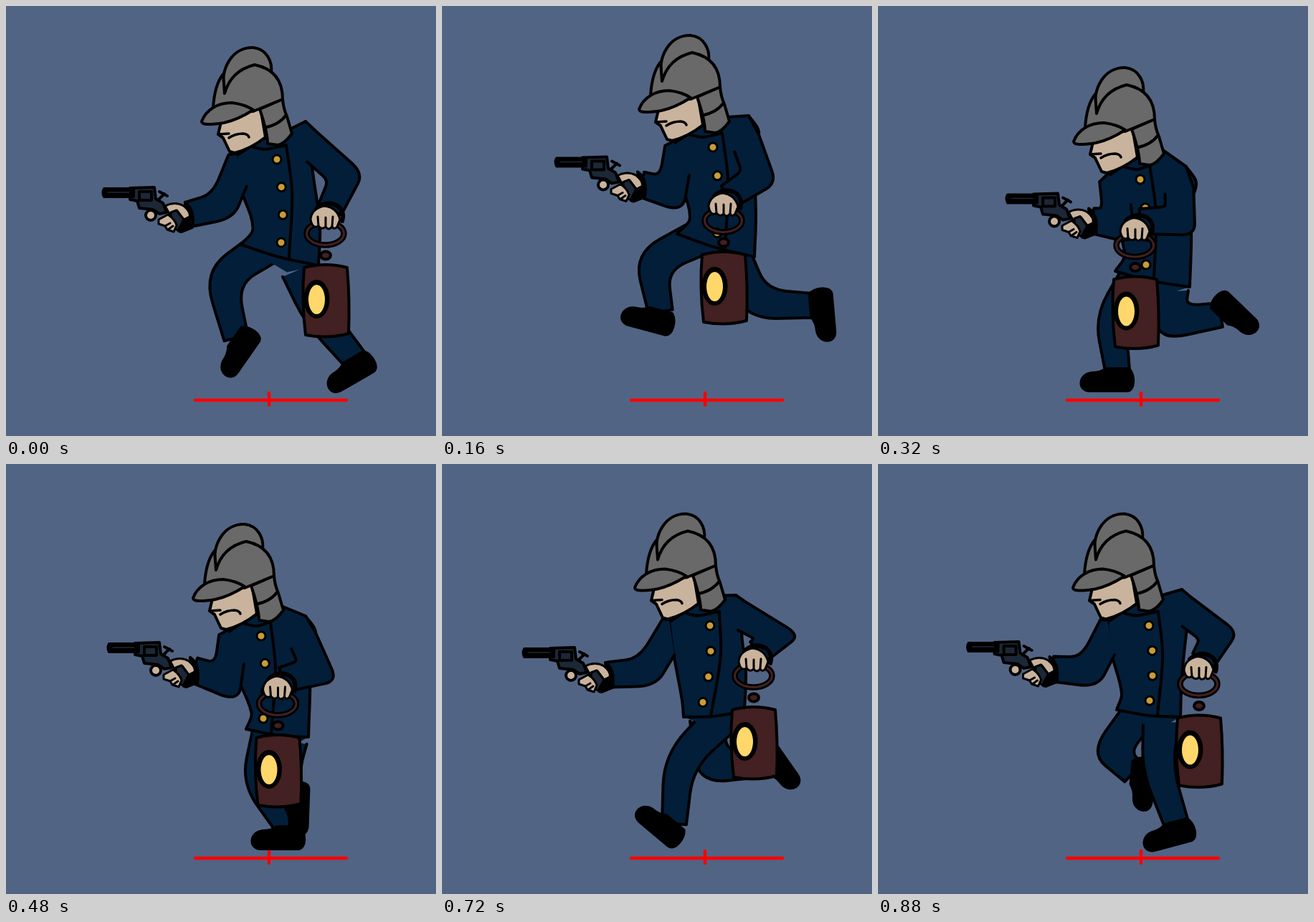
These frames come from a looping animation (600 px wide and 600 px high, 960 ms). An HTML page:

```html
<!DOCTYPE html>
<html lang="en">
<head>
<meta charset="utf-8">
<title>Running fireman</title>
<style>
html, body { margin: 0; width: 100%; height: 100%; overflow: hidden; background: #526484; }
svg { display: block; width: 100vw; height: 100vh; }
.ink { stroke: #000; stroke-width: 4; stroke-linejoin: round; stroke-linecap: round; }
.line { fill: none; }
.navy { fill: #031e39; }
.steel { fill: #696969; }
.skin { fill: #cab39c; }
.bag { fill: #432021; }
.iron { fill: #1c2737; }
.gold { fill: #c99c36; stroke-width: 3; }
.thin { stroke-width: 3; }
</style>
</head>
<body>
<svg viewBox="0 0 600 600">
  <defs>
    <path id="shoe" d="M-16 -2H16C24 6 25 28 14 29H-38C-56 29 -54 6 -36 4Q-24 4 -16 -2Z"/>
  </defs>
  <rect width="600" height="600" fill="#526484"/>
  <path d="M264 550H475M367 540V557" stroke="#f00" stroke-width="4.5" stroke-linecap="round"/>
  <g class="ink">
    <path id="legA" class="navy"/>
    <use id="shoeA" href="#shoe"/>
    <path id="legB" class="navy"/>
    <use id="shoeB" href="#shoe"/>
    <path id="seat" class="navy" stroke="none"/>
    <path id="coat" class="navy"/>
    <path id="gunArm" class="navy"/>
    <path id="placket" class="line"/>
    <g id="buttons"></g>
    <path id="bagArm" class="navy"/>

    <g id="head">
      <path class="skin" d="M300 162L296 179L303 184L312 203L319 205Q342 199 362 183L355 142Z"/>
      <path class="line" d="M296 179L311 178M311 184Q320 178 331 178Q338 179 339 183" stroke-width="3.5"/>
      <path class="steel" d="M305 122C297 86 317 57 345 58C364 60 372 78 370 93L347 84Z"/>
      <path class="steel" d="M354 144L386 130Q387 143 392 154L399 178Q388 193 379 194L365 192Q365 176 354 144Z"/>
      <path class="line" d="M360 170Q381 166 391 152"/>
      <path class="steel" d="M289 142Q291 110 303 95L305 122Q314 90 347 82Q386 90 386 130L345 147Z"/>
      <path class="steel" d="M273 161C279 145 295 135 315 135Q333 137 345 145Q323 159 304 163Q273 168 273 161Z"/>
    </g>

    <g id="gun">
      <path d="M250 274Q264 284 260 309L245 315Q235 314 244 303Q253 292 250 274Z"/>
      <path class="iron" d="M173 254L207 253L209 269L219 275L224 288L214 290L205 284L186 282L183 272L173 270Z"/>
      <path d="M137 255H178V266H137Q134 260 137 255Z"/>
      <path class="line" d="M142 260H172" style="stroke:#1c2737;stroke-width:1.5"/>
      <path class="iron" d="M186 259H203V271H186Z"/>
      <path class="line" d="M213 270L221 262M214 259L225 265"/>
      <path class="skin thin" d="M222 279Q236 272 248 279Q258 287 256 294L248 298L239 286L228 290Z"/>
      <path class="iron thin" d="M230 288L238 285L248 298L240 313L231 309Z"/>
      <circle class="skin" cx="202" cy="292" r="7"/>
      <path class="skin thin" d="M213 298L226 291Q236 298 238 306L234 315L225 312L222 307L213 304Z"/>
      <path class="line thin" d="M222 307L229 303M226 312L233 307"/>
    </g>

    <g id="bag">
      <path class="line" d="M433 283Q447 270 463 279Q473 287 469 300" stroke-width="6"/>
      <ellipse class="line" cx="445.500" cy="317.500" rx="26" ry="16" stroke-width="8.5"/>
      <ellipse class="line" cx="445.500" cy="317.500" rx="26" ry="16" style="stroke:#432021;stroke-width:3"/>
      <path class="skin thin" d="M425 298Q426 283 444 279Q462 281 466 298L462 308Q458 313 455 308Q450 314 446 308Q441 313 436 307Q428 312 425 298Z"/>
      <path class="line thin" d="M435 294L436 307M446 295V308M456 294L455 308"/>
      <ellipse class="bag" cx="446" cy="348" rx="7" ry="5.500"/>
      <path class="bag" d="M416 365Q446 357 476 365Q480 410 478 457Q450 465 418 459Q412 410 416 365Z"/>
      <ellipse cx="433.500" cy="409" rx="16" ry="25"/>
      <ellipse cx="433.500" cy="409.500" rx="11.500" ry="20.500" fill="#ffd76b" stroke="none"/>
    </g>
  </g>
</svg>
<script>
const STEP = 80, COUNT = 12;

// Steps of the run cycle at which the joints below are set.
const beats = [0, 2, 4, 6, 8, 9, 11];
const joints = {
  head: [[0, 0], [2, -17], [0, 28], [-12, 26], [0, 3.5], [-4, 11.5], [-1, 11.5]],
  gun: [[0, 0], [23, -42.5], [44, 8.5], [7, -4], [-8, -20], [-22, 3], [-10.5, -5]],
  bag: [[0, 0], [-53, -18], [-87, 16.5], [-66.5, 17], [-29, -18], [-11, -22], [2, -10.5]],
  back: [[418, 161], [428, 153], [430, 224], [418, 212], [415, 185], [410, 183], [424, 175]],
  hemL: [[328, 333], [328, 318], [331, 370], [335, 370], [340, 344], [337, 353], [333, 343]],
  hemR: [[436, 362], [436, 350], [435, 392], [422, 381], [425, 338], [422, 345], [422, 353]],
  // x of the top and bottom button
  row: [[378, 384], [378, 384], [366, 374], [356, 359], [366, 361], [374, 364], [378, 379]],
  kneeA: [[299, 380], [291, 357], [324, 438], [351, 442], [385, 432], [376, 424], [324, 401]],
  kneeB: [[436, 432], [440, 416], [410, 443], [390, 420], [331, 369], [330, 415], [390, 425]],
  // x, y and tilt of the foot
  footA: [[321, 463, -55], [305, 427, 15], [334, 508, 0], [394, 508, 0], [457, 440, -88], [450, 419, -125], [356, 431, -85]],
  footB: [[486, 492, -30], [516, 418, -95], [478, 431, -136], [393, 466, -88], [338, 430, 8], [324, 502, 40], [416, 501, -15]]
};

const el = id => document.getElementById(id);
const add = (p, x, y) => [p[0] + x, p[1] + y];
const mix = (a, b, u) => a.map((v, i) => v + (b[i] - v) * u);
const sharp = p => Object.assign([...p], { sharp: true });

// Smooth periodic interpolation through the values at the beats.
function sample(track, step) {
  const n = beats.length;
  const time = i => beats[(i + n) % n] + COUNT * Math.floor(i / n);
  const value = i => track[(i + n) % n];
  let i = n - 1;
  while (beats[i] > step) i--;
  const h = time(i + 1) - time(i), u = (step - time(i)) / h;
  const slope = (j, k) => (value(j + 1)[k] - value(j - 1)[k]) / (time(j + 1) - time(j - 1));
  return value(i).map((a, k) => {
    const b = value(i + 1)[k], w = 1 - u;
    return a * w * w * (1 + 2 * u) + b * u * u * (3 - 2 * u)
      + h * u * w * (slope(i, k) * w - slope(i + 1, k) * u);
  });
}

// Control point leaving p towards q, with o as p's other neighbour.
function handle(o, p, q) {
  const len = Math.hypot(q[0] - p[0], q[1] - p[1]) / 3;
  const from = p.sharp || !o ? p : o;
  const dx = q[0] - from[0], dy = q[1] - from[1], d = Math.hypot(dx, dy) || 1;
  return add(p, dx / d * len, dy / d * len);
}

function curve(pts, closed) {
  const n = pts.length;
  const at = i => closed ? pts[(i + n) % n] : pts[i];
  let d = `M${pts[0]}`;
  for (let i = 0; i < (closed ? n : n - 1); i++) {
    const p = at(i), q = at(i + 1);
    d += `C${handle(at(i - 1), p, q)} ${handle(at(i + 2), q, p)} ${q}`;
  }
  return closed ? d + "Z" : d;
}

function normal(a, b) {
  const d = Math.hypot(b[0] - a[0], b[1] - a[1]) || 1;
  return [(b[1] - a[1]) / d, (a[0] - b[0]) / d];
}

// Tapered sleeve around a-b-c, left open at a. The side that starts
// at cap is outlined in full, the other one only up to the gap.
function limb([a, b, c], widths, { bend, side = 1, cap, gap = 0 }) {
  const n1 = normal(a, b), n2 = normal(b, c);
  const m = [n1[0] + n2[0], n1[1] + n2[1]];
  const k = 1 / Math.max(0.7, 1 + n1[0] * n2[0] + n1[1] * n2[1]);
  const norms = [n1, [m[0] * k, m[1] * k], n2];
  const edge = s => [a, b, c].map((p, i) =>
    add(p, norms[i][0] * widths[i] / 2 * s, norms[i][1] * widths[i] / 2 * s));
  const round = (p, q, r) => `L${mix(q, p, bend)}Q${q} ${mix(q, r, bend)}L${r}`;
  const [a1, b1, c1] = edge(side), [a2, b2, c2] = edge(-side);
  return `M${cap || a1}L${a1}${round(a1, b1, c1)}L${c2}${round(c2, b2, mix(a2, b2, gap))}`;
}

function build(step) {
  const { head, gun, bag, back, hemL, hemR, row, kneeA, kneeB, footA, footB } =
    Object.fromEntries(Object.keys(joints).map(k => [k, sample(joints[k], step)]));
  const onHead = (x, y) => add(head, x, y);
  const hem = u => mix(hemL, hemR, u);
  const neck = onHead(317, 209);

  const gunElbow = [303 + 0.75 * gun[0], neck[1] + 70];
  const bagElbow = [474 + 0.6 * bag[0], (bag[1] - 0.5 * bag[0] + back[1] + 316) / 2];
  const shoulder = add(mix(back, bagElbow, 0.2), -8, 15);

  const top = [row[0], head[1] + 214];
  const low = [row[1], hem((row[1] - hemL[0]) / (hemR[0] - hemL[0]))[1] - 18];
  const onRow = u => add(mix(top, low, u), 5 * Math.sin(Math.PI * u), 0);

  const waist = add(hemL, 2 + (hemR[1] - hemL[1]) / 2, -23);
  const coat = [
    sharp(add(neck, 4, 0)), add(neck, 10, 44), waist, sharp(hemL), add(hem(0.5), 0, 3),
    sharp(hemR), add(hemR, 2, -55), add(back, 8, 48), add(back, 14, 22),
    sharp(back), sharp(onHead(396, 172)), onHead(360, 185)
  ];
  const collar = [onHead(345, 197), onHead(362, 200), sharp(add(top, 13, -20))];
  const leg = [50, 42, 34], arm = [40, 40, 35];

  return {
    d: {
      legA: limb([add(hemL, 34, 4), kneeA, footA.slice(0, 2)], leg, { bend: 0.45 }),
      legB: limb([add(hemR, -27, 6), kneeB, footB.slice(0, 2)], leg, { bend: 0.45 }),
      seat: `M${hemL}L${hemR}L${add(hem(0.5), 10, 24)}Z`,
      coat: curve(coat, true),
      gunArm: limb([add(neck, 12, 6), gunElbow, add(gun, 254, 291)], arm,
        { bend: 0.4, side: -1, cap: add(neck, 4, -3), gap: 0.4 }),
      bagArm: limb([shoulder, bagElbow, add(bag, 452, 284)], arm,
        { bend: 0.25, cap: back, gap: 0.3 }),
      placket: curve([...collar, add(onRow(0.4), 14, 0), add(low, 11, 20)])
    },
    transform: {
      head: `translate(${head})`,
      gun: `translate(${gun})`,
      bag: `translate(${bag})`,
      shoeA: `translate(${footA.slice(0, 2)}) rotate(${footA[2]})`,
      shoeB: `translate(${footB.slice(0, 2)}) rotate(${footB[2]})`
    },
    buttons: [0, 1, 2, 3].map(i => onRow(i / 3))
  };
}

const buttons = [0, 1, 2, 3].map(() => {
  const c = document.createElementNS("http://www.w3.org/2000/svg", "circle");
  c.setAttribute("r", 6);
  c.setAttribute("class", "gold");
  return el("buttons").appendChild(c);
});

function draw(pose) {
  for (const attr of ["d", "transform"]) {
    for (const id in pose[attr]) el(id).setAttribute(attr, pose[attr][id]);
  }
  buttons.forEach((c, i) => {
    c.setAttribute("cx", pose.buttons[i][0]);
    c.setAttribute("cy", pose.buttons[i][1]);
  });
}

const poses = Array.from({ length: COUNT }, (_, i) => build(i));
const start = performance.now();
function tick() {
  const t = performance.now() - start;
  draw(poses[Math.floor(t / STEP) % COUNT]);
  requestAnimationFrame(tick);
}
tick();
</script>
</body>
</html>
```
